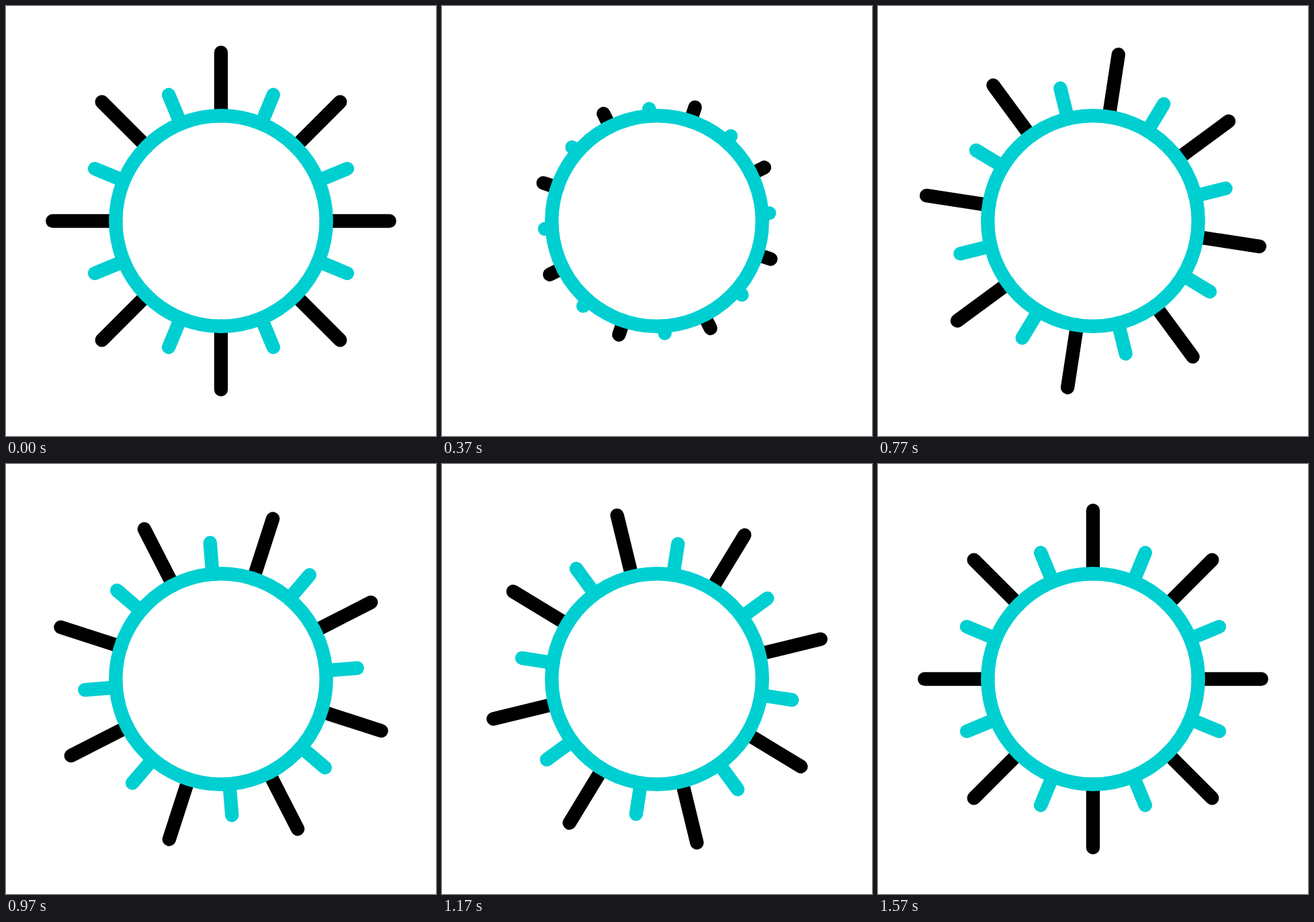
Animation of 640 by 640 pixels, one loop 1670 ms. Source, as an HTML page:

```html
<!DOCTYPE html>
<html lang="en">
<head>
<meta charset="utf-8">
<title>Sun</title>
<style>
  html, body { margin: 0; height: 100%; overflow: hidden; background: #fff; }
  svg { display: block; width: 100vw; height: 100vh; }
  line, circle { fill: none; stroke-width: 20.4; stroke-linecap: round; }
</style>
</head>
<body>
<svg viewBox="-320 -320 640 640">
  <g id="rays"></g>
  <circle r="156.7" stroke="#00cfd1"/>
</svg>
<script>
  const LOOP = 1670, LAST = 47, BASE = 156.7;
  const LONG = { tip: 250.7, color: '#000', lines: [] };
  const SHORT = { tip: 203.4, color: '#00cfd1', lines: [] };
  const rays = document.getElementById('rays');

  for (let i = 0; i < 16; i++) {
    const kind = i % 2 ? SHORT : LONG;
    const line = document.createElementNS('http://www.w3.org/2000/svg', 'line');
    line.setAttribute('y1', -BASE);
    line.setAttribute('stroke', kind.color);
    line.setAttribute('transform', `rotate(${i * 22.5})`);
    kind.lines.push(line);
    rays.append(line);
  }

  // cubic-bezier(.42, 0, .58, 1)
  function ease(x) {
    let lo = 0, hi = 1;
    for (let i = 0; i < 24; i++) {
      const t = (lo + hi) / 2;
      if (t * (1.26 + t * (-0.78 + t * 0.52)) < x) lo = t; else hi = t;
    }
    return lo * lo * (3 - 2 * lo);
  }

  // Keys are [step, value] pairs
  function track(keys, k) {
    for (let i = 1; i < keys.length; i++) {
      const [k0, v0] = keys[i - 1], [k1, v1] = keys[i];
      if (k <= k1) return v0 + (v1 - v0) * ease((k - k0) / (k1 - k0));
    }
    return keys[keys.length - 1][1];
  }

  const TURN = [[0, 0], [18, -38.65], [47, 0]];
  const GROW = [[0, 1], [6.5, 0], [20, 1]];

  function draw(ms) {
    // 30 steps per second on a 10 ms grid, then a short hold
    const k = Math.min(LAST, Math.floor((Math.floor(ms / 10) + 0.5) * 0.3));
    const grow = track(GROW, k);
    rays.setAttribute('transform', `rotate(${track(TURN, k)})`);
    for (const { tip, lines } of [LONG, SHORT]) {
      const y = -(BASE + (tip - BASE) * grow);
      for (const line of lines) line.setAttribute('y2', y);
    }
  }

  const start = performance.now();
  function tick() {
    draw((performance.now() - start) % LOOP);
    requestAnimationFrame(tick);
  }
  tick();
</script>
</body>
</html>
```
